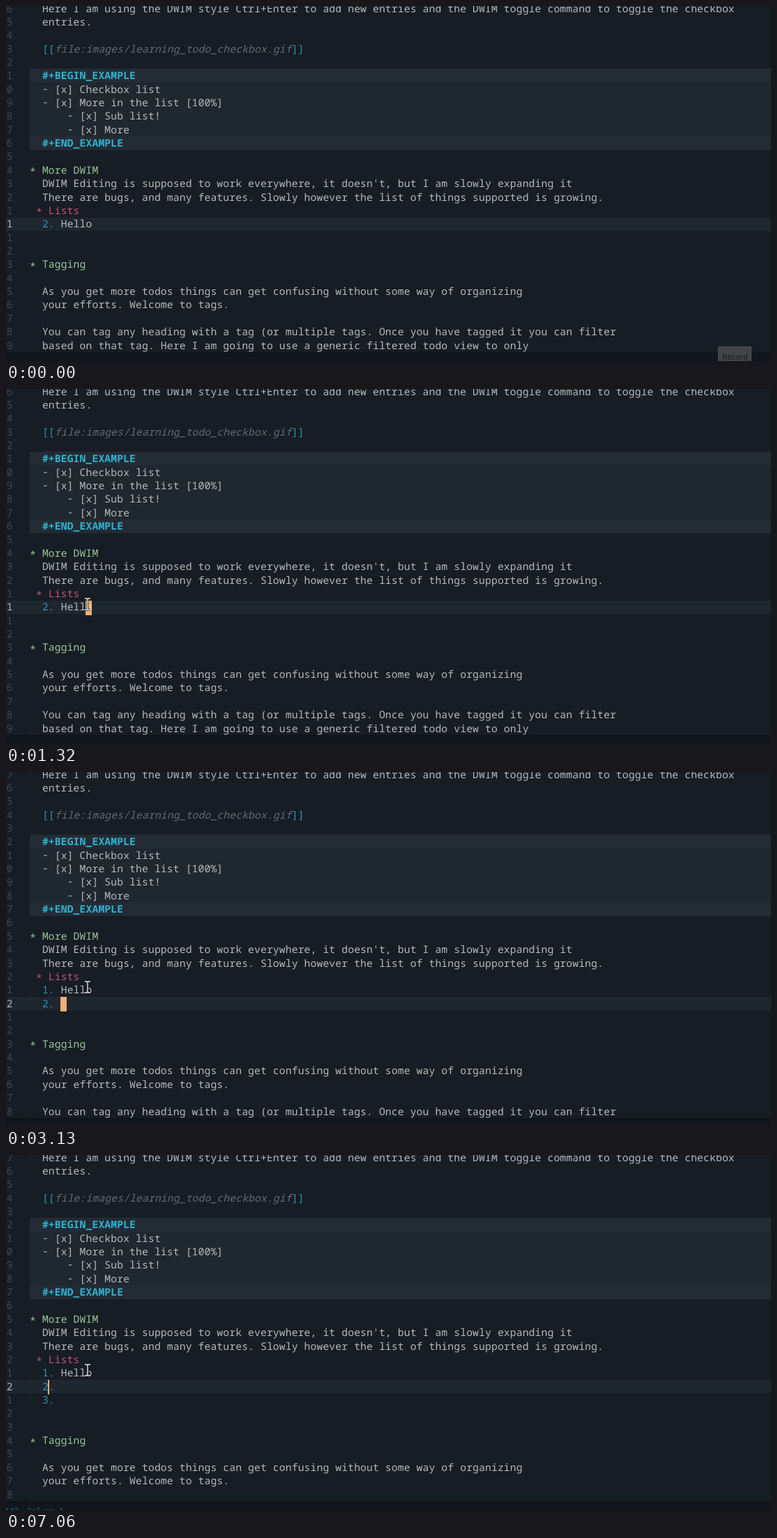
Recreate the animation shown at these times as an HTML page with a canvas. Size 1097 px wide and 510 px high, loop 8 s.

```html
<!DOCTYPE html>
<html lang="en">
<head>
<meta charset="utf-8">
<title>Outline editor</title>
<style>
html, body { margin: 0; width: 100%; height: 100%; overflow: hidden; background: #161d24; }
canvas { display: block; }
</style>
</head>
<body>
<canvas id="stage" width="1097" height="510"></canvas>
<script>
const ctx = document.getElementById('stage').getContext('2d');
const LOOP = 8000, LEFT = 34, CELL = 8.945, PITCH = 19.36;
const MONO = '14.7px "Noto Sans Mono", "DejaVu Sans Mono", monospace';
const TEXT = '#b5babc', CYAN = '#2fb4d0', BLUE = '#3592b2', GREEN = '#98c897',
      PINK = '#c4527a', GRAY = '#606c76', CARET = '#f2ae74';

const head = [
  '  Here I am using the DWIM style Ctrl+Enter to add new entries and the DWIM toggle command to toggle the checkbox',
  '  entries.',
  '',
  '  [[file:images/learning_todo_checkbox.gif]]',
  '',
  '  #+BEGIN_EXAMPLE',
  '  - [x] Checkbox list',
  '  - [x] More in the list [100%]',
  '      - [x] Sub list!',
  '      - [x] More',
  '  #+END_EXAMPLE',
  '',
  '* More DWIM',
  "  DWIM Editing is supposed to work everywhere, it doesn't, but I am slowly expanding it",
  '  There are bugs, and many features. Slowly however the list of things supported is growing.',
  ' * Lists'
];
const tail = [
  '',
  '',
  '* Tagging',
  '',
  '  As you get more todos things can get confusing without some way of organizing',
  '  your efforts. Welcome to tags.',
  '',
  '  You can tag any heading with a tag (or multiple tags. Once you have tagged it you can filter',
  '  based on that tag. Here I am going to use a generic filtered todo view to only'
];

// Pointer steps: time, x, y (no position means hidden)
const pointerSteps = [
  [0], [220, 627, 268], [310, 547, 242], [530, 366, 280], [610, 184, 317],
  [840, 160, 311], [910, 136, 304], [990, 119, 310], [1070, 117, 309],
  [2570], [3130, 117, 309], [6130], [6840, 117, 309]
];
// Caret steps: time, row, column, width
const caretSteps = [
  [0, 16], [1150, 16, 9, 9], [2870, 17, 5, 9], [3410, 18, 5, 9],
  [6210, 17, 4, 9], [6360, 17, 3, 9], [7060, 17, 3, 2]
];
// Baseline offsets from the row centre for raised or lowered signs
const baseline = { '*': 7.5, '-': 4 };

const stepAt = (steps, t) => steps.filter(s => s[0] <= t).pop();
const rowY = row => 3.5 + row * PITCH;

function rect(color, x, y, w, h) {
  ctx.fillStyle = color;
  ctx.fillRect(x, Math.round(y), w, Math.round(y + h) - Math.round(y));
}

function band(color, row, x) {
  rect(color, x, rowY(row) - 9.5, 1097 - x, PITCH);
}

// Draw on the character grid
function write(text, x, y, color, style = '300') {
  ctx.font = style + ' ' + MONO;
  ctx.fillStyle = color;
  [...text].forEach((c, i) => {
    if (c !== ' ') ctx.fillText(c, x + i * CELL, y + (baseline[c] || 5));
  });
}

function runsOf(line) {
  if (line.startsWith('* ')) return [[line, GREEN]];
  if (line.startsWith(' * ')) return [[line, PINK]];
  if (line.includes('#+')) return [[line, CYAN, 'bold']];
  const link = line.match(/^(\s*\[\[)(.*)(\]\])$/);
  if (link) return [[link[1], BLUE], [link[2], GRAY, 'italic 300'], [link[3], BLUE]];
  const item = line.match(/^(\s*\d\.)(.*)$/);
  return item ? [[item[1], BLUE], [item[2], TEXT]] : [[line, TEXT]];
}

function writeLine(line, row) {
  let x = LEFT;
  for (const [text, color, style] of runsOf(line)) {
    write(text, x, rowY(row), color, style);
    x += text.length * CELL;
  }
}

function drawPointer(x, y) {
  const beam = new Path2D(`M${x - 4} ${y - 8}h3l1 1l1 -1h3M${x} ${y - 7}v14M${x - 4} ${y + 8}h3l1 -1l1 1h3`);
  ctx.strokeStyle = '#10151a';
  ctx.lineWidth = 3;
  ctx.stroke(beam);
  ctx.strokeStyle = '#e8eaeb';
  ctx.lineWidth = 1.4;
  ctx.stroke(beam);
}

function draw(t) {
  const list = t < 2870 ? ['  2. Hello']
    : ['  1. Hello', '  2.', '  3.'].slice(0, t < 3410 ? 2 : 3);
  const lines = [...head, ...list, ...tail].slice(0, 26);
  const tagging = lines.indexOf('* Tagging');
  const [, current, column, width] = stepAt(caretSteps, t);

  ctx.textRendering = 'geometricPrecision';
  rect('#161d24', 0, 0, 1097, 510);
  rect('#232b35', LEFT, 90, 1063, 117);
  rect('#1f272f', LEFT, 110, 1063, 77);
  band('#1e262f', current, 0);

  lines.forEach((line, row) => {
    const guided = line.startsWith('  ') || row < 5 || row > tagging;
    if (guided && (row < 5 || row > 10)) rect('#1e262d', LEFT, rowY(row) - 9.5, 1, PITCH);
    const digit = row === current ? current - 15 : Math.abs(row - current) % 10;
    write(String(digit), 0.8, rowY(row), row === current ? TEXT : '#3f4850');
    writeLine(line, row);
  });

  if (width) {
    const x = LEFT + column * CELL, y = rowY(current);
    rect(CARET, Math.floor(x), y - 9.5, width, PITCH + 1.4);
    const under = lines[current][column];
    if (width > 2 && under) write(under, x, y, '#f7dcc4');
  }

  rect('#12171d', 0, 497, 1097, 13);
  rect('#10141a', 0, 497, 1097, 2);
  if (t >= 7060) {
    ctx.font = '10.7px "Noto Sans Mono", monospace';
    ctx.fillStyle = '#26798c';
    ctx.textAlign = 'right';
    ctx.fillText('Line 142, Column 4', 82, 515);
    ctx.textAlign = 'left';
  }
  if (t < 70) {
    rect('#4c4f52', 1021, 489, 48, 21);
    rect('#414447', 1022, 490, 46, 20);
    ctx.font = '11.3px "Open Sans", sans-serif';
    ctx.fillStyle = '#14181c';
    ctx.fillText('Record', 1027, 508);
  }

  const [, px, py] = stepAt(pointerSteps, t);
  if (px) drawPointer(px, py);
}

const start = performance.now();
function tick() {
  draw((performance.now() - start) % LOOP);
  requestAnimationFrame(tick);
}
tick();
</script>
</body>
</html>
```
